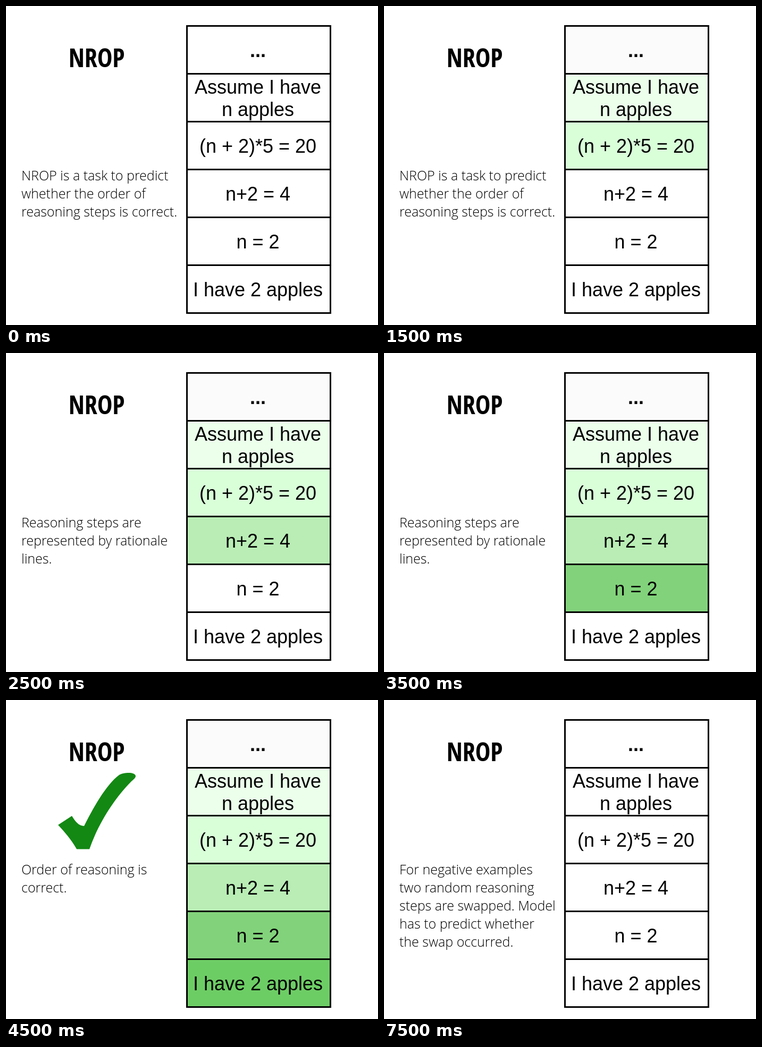
Animation of 700 by 600 pixels, one loop 8 s. Source, as an HTML page:

```html
<!DOCTYPE html>
<html lang="en">
<head>
<meta charset="utf-8">
<title>NROP</title>
<style>
  html, body { margin: 0; width: 100%; height: 100%; overflow: hidden; background: #fff; }
  svg { display: block; width: 700px; height: 600px; }
  .title { font: 700 48px "Open Sans Condensed", "Open Sans", sans-serif; font-stretch: 75%; text-anchor: middle; }
  .note { font: 300 25px "Open Sans", sans-serif; }
  .step { font: 36px "Liberation Sans", Arial, sans-serif; text-anchor: middle; }
  .bold { font-weight: 700; }
</style>
</head>
<body>
<svg viewBox="0 0 700 600" xmlns="http://www.w3.org/2000/svg">
  <text class="title" x="170.5" y="115">NROP</text>
  <path id="check" fill="#138813" d="M98 235L124 218C130 228 137 237 147 237C162 207 188 159 213 141C222 136 243 135 244 143C244 147 239 150 235 154C206 183 174 231 157 280.5H133C124 264 111 249 98 235Z"/>
  <g id="notes"></g>
  <g id="steps"></g>
</svg>
<script>
const LOOP = 8000;
const STEPS = [
  { lines: ["..."], color: "#fbfbfb", at: 500 },
  { lines: ["Assume I have", "n apples"], color: "#ebffeb", at: 500 },
  { lines: ["(n + 2)*5 = 20"], color: "#d9ffd9", at: 1500 },
  { lines: ["n+2 = 4"], color: "#b9edb5", at: 2500 },
  { lines: ["n = 2"], color: "#82d27b", at: 3500 },
  { lines: ["I have 2 apples"], color: "#6dcd65", at: 4500 },
];
const RESET = 7500;
const NOTES = [
  { at: 0, lines: ["NROP is a task to predict", "whether the order of", "reasoning steps is correct."] },
  { at: 2500, lines: ["Reasoning steps are", "represented by rationale", "lines."] },
  { at: 4500, lines: ["Order of reasoning is", "correct."] },
  { at: RESET, lines: ["For negative examples", "two random reasoning", "steps are swapped. Model", "has to predict whether", "the swap occurred."] },
];

function add(parent, tag, attrs, text = "") {
  const node = document.createElementNS("http://www.w3.org/2000/svg", tag);
  for (const key in attrs) node.setAttribute(key, attrs[key]);
  node.textContent = text;
  return parent.appendChild(node);
}

const check = document.getElementById("check");
const stepLayer = document.getElementById("steps");
const noteLayer = document.getElementById("notes");

const cells = STEPS.map(({ lines }, row) => {
  const top = 37.5 + 90 * row;
  const cell = add(stepLayer, "rect", { x: 340.5, y: top, width: 270, height: 90, stroke: "#000", "stroke-width": 3 });
  const baseline = top + (lines.length > 1 ? 37.5 : 58.5);
  lines.forEach((line, i) => add(stepLayer, "text",
    { class: row ? "step" : "step bold", x: 474, y: baseline + 42 * i }, line));
  return cell;
});

const notes = NOTES.map(({ lines }) => {
  const group = add(noteLayer, "g", {});
  lines.forEach((line, i) => add(group, "text", { class: "note", x: 29, y: 328 + 34 * i }, line));
  return group;
});

const show = (node, on) => node.setAttribute("visibility", on ? "visible" : "hidden");

function render(t) {
  cells.forEach((cell, i) => {
    const lit = t >= STEPS[i].at && t < RESET;
    cell.setAttribute("fill", lit ? STEPS[i].color : "#fff");
  });
  const current = NOTES.findLastIndex(note => t >= note.at);
  notes.forEach((group, i) => show(group, i === current));
  show(check, t >= 4500 && t < RESET);
}

const start = performance.now();
function tick() {
  render((performance.now() - start) % LOOP);
  requestAnimationFrame(tick);
}
tick();
</script>
</body>
</html>
```
